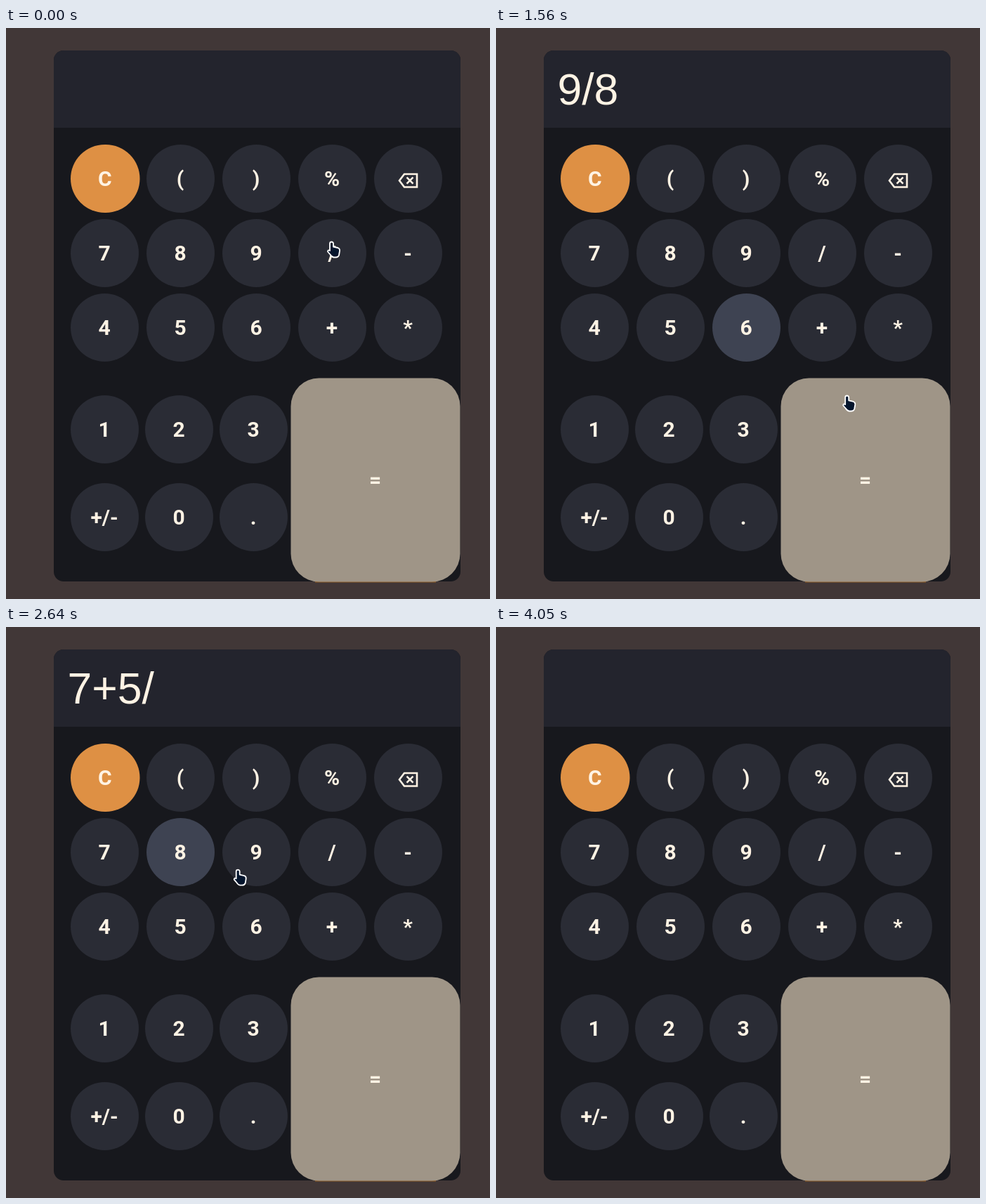
Animation of 689x813 px, one loop 4170 ms. Source, as an HTML page:

```html
<!DOCTYPE html>
<html lang="en">
<head>
<meta charset="utf-8">
<title>Calculator</title>
<style>
  html, body { margin: 0; height: 100%; overflow: hidden; background: #413737; }
  svg { display: block; width: 689px; height: 813px; }
  text { font: 600 30px Roboto, Arial, sans-serif; fill: #fff3e4; text-anchor: middle; }
  #display { font: 62.5px "Liberation Sans", Arial, sans-serif; text-anchor: start; }
  .key { fill: #2a2c35; }
  .key.hover { fill: #3e4352; }
  .clear { fill: #de9044; }
  .clear.hover { fill: #e7a970; }
  .equals { fill: #9f9587; }
  .equals.hover { fill: #cdc8c1; }
  .icon { fill: none; stroke: #fff3e4; stroke-width: 2.6; }
  .cursor { fill: #04152d; stroke: #fff; stroke-width: 1.8; stroke-linejoin: round; }
</style>
</head>
<body>
<svg viewBox="0 0 689 813">
  <rect x="68" y="32" width="579" height="756" rx="14" fill="#17181d"/>
  <path d="M68 142V46a14 14 0 0 1 14-14H633a14 14 0 0 1 14 14V142z" fill="#23242d"/>
  <text id="display" x="87.5" y="108.5"></text>
  <path d="M440 788.500H612" stroke="#8a5a28" stroke-width="2"/>
  <g id="keys"></g>
  <path class="icon" d="M567 208H585V226.500H567L560 217.200zM570.500 212.700l9 9m0-9l-9 9"/>
  <path class="cursor" id="hand" d="M-5.500 1.500V-8.500a2.500 2.500 0 0 1 5 0V-4L6-2.500Q9-1.500 8.500 2L7.500 8Q6.500 11 3 11H0Q-3 10.500-5 7L-8.500 3Q-8.500 0-5.500 1.500z"/>
  <path class="cursor" id="arrow" d="M1 2V15Q4 17.500 8 16.500L13 14.500V8Q10 3 4 1Q1 0 1 2z"/>
</svg>
<script>
const LOOP = 4170, STEP = 30, MOVE = 220;
const LAG = 50;                    // the page reacts a little after the pointer
const TIP_X = -4, TIP_Y = -10;     // fingertip relative to the hand
const $ = id => document.getElementById(id);
const keys = {};
const spots = { edge: [634, 192], out: [710, 30] };

function add(name, attrs) {
  const el = document.createElementNS('http://www.w3.org/2000/svg', name);
  for (const k in attrs) el.setAttribute(k, attrs[k]);
  return $('keys').appendChild(el);
}

function addKey(label, x, y, kind = 'key', width = 97, height = 97, r = 48.5) {
  const cx = x + width / 2, cy = y + height / 2;
  const el = add('rect', { x, y, width, height, rx: r, class: kind });
  keys[label] = { el, cx, cy, width, height, r };
  spots[label] = [cx + 2, cy - 5];
  if (label !== 'del') add('text', { x: cx - 0.5, y: cy + 10.5 }).textContent = label;
}

function addRow(labels, y, pitch) {
  labels.split(' ').forEach((label, i) => {
    const clear = label === 'C';
    addKey(label, 92 + i * pitch, y, clear ? 'clear' : 'key', clear ? 98.5 : 97);
  });
}

addRow('C ( ) % del', 166, 108);
addRow('7 8 9 / -', 272, 108);
addRow('4 5 6 + *', 378, 108);
addRow('1 2 3', 523, 106);
addRow('+/- 0 .', 648, 106);
addKey('=', 405.5, 498.5, 'equals', 241, 290, 40);
spots['='] = [583, 647];

// The pointer sets off for each stop at the matching time;
// a typed key counts as pressed once the pointer leaves it.
const typed = [...'9/8=C7+5/8=CC'];
const route = [...typed, '8', '-', 'edge', 'out'];
const departs = [0, 710, 1170, 1477, 1720, 1960, 2085, 2370, 2460, 2550,
  2620, 2850, 3280, 3580, 3660, 3710, 3970];

const stopAt = t => departs.findLastIndex(d => d <= t);

function pointer(t) {
  const i = stopAt(t);
  const [x0, y0] = spots[route[i - 1] ?? '/'], [x1, y1] = spots[route[i]];
  const time = Math.min(MOVE, (departs[i + 1] ?? 4070) - departs[i]);
  const u = Math.min(1, (t - departs[i]) / time);
  const k = 1 - (1 - u) ** 3;
  return [x0 + (x1 - x0) * k, y0 + (y1 - y0) * k ** 1.5];
}

function keyUnder([x, y]) {
  return Object.values(keys).find(({ cx, cy, width, height, r }) => {
    const dx = Math.abs(x + TIP_X - cx) - width / 2 + r;
    const dy = Math.abs(y + TIP_Y - cy) - height / 2 + r;
    return Math.hypot(Math.max(dx, 0), Math.max(dy, 0)) < r;
  });
}

const evaluate = sum => sum.split('+')
  .map(term => term.split('/').reduce((a, b) => a / b))
  .reduce((a, b) => +a + +b, 0);

const press = (line, key) =>
  key === 'C' ? '' : key === '=' ? String(evaluate(line)) : line + key;

// The page stalls on its first click, then catches up.
const pageTime = t => t < 1080 ? Math.min(t - LAG, 700) : t - LAG;

function draw(now) {
  const t = Math.floor(now % LOOP / STEP) * STEP;
  const page = Math.max(0, pageTime(t));
  const hovered = t > 2 * LAG ? keyUnder(pointer(page)) : null;
  for (const key of Object.values(keys)) key.el.classList.toggle('hover', key === hovered);
  $('display').textContent = typed.slice(0, stopAt(page)).reduce(press, '');

  const spot = pointer(t), overKey = keyUnder(spot);
  $('hand').style.display = overKey ? '' : 'none';
  $('arrow').style.display = overKey ? 'none' : '';
  $(overKey ? 'hand' : 'arrow').setAttribute('transform', `translate(${spot})`);
}

const start = performance.now();
function tick() {
  draw(performance.now() - start);
  requestAnimationFrame(tick);
}
tick();
</script>
</body>
</html>
```
